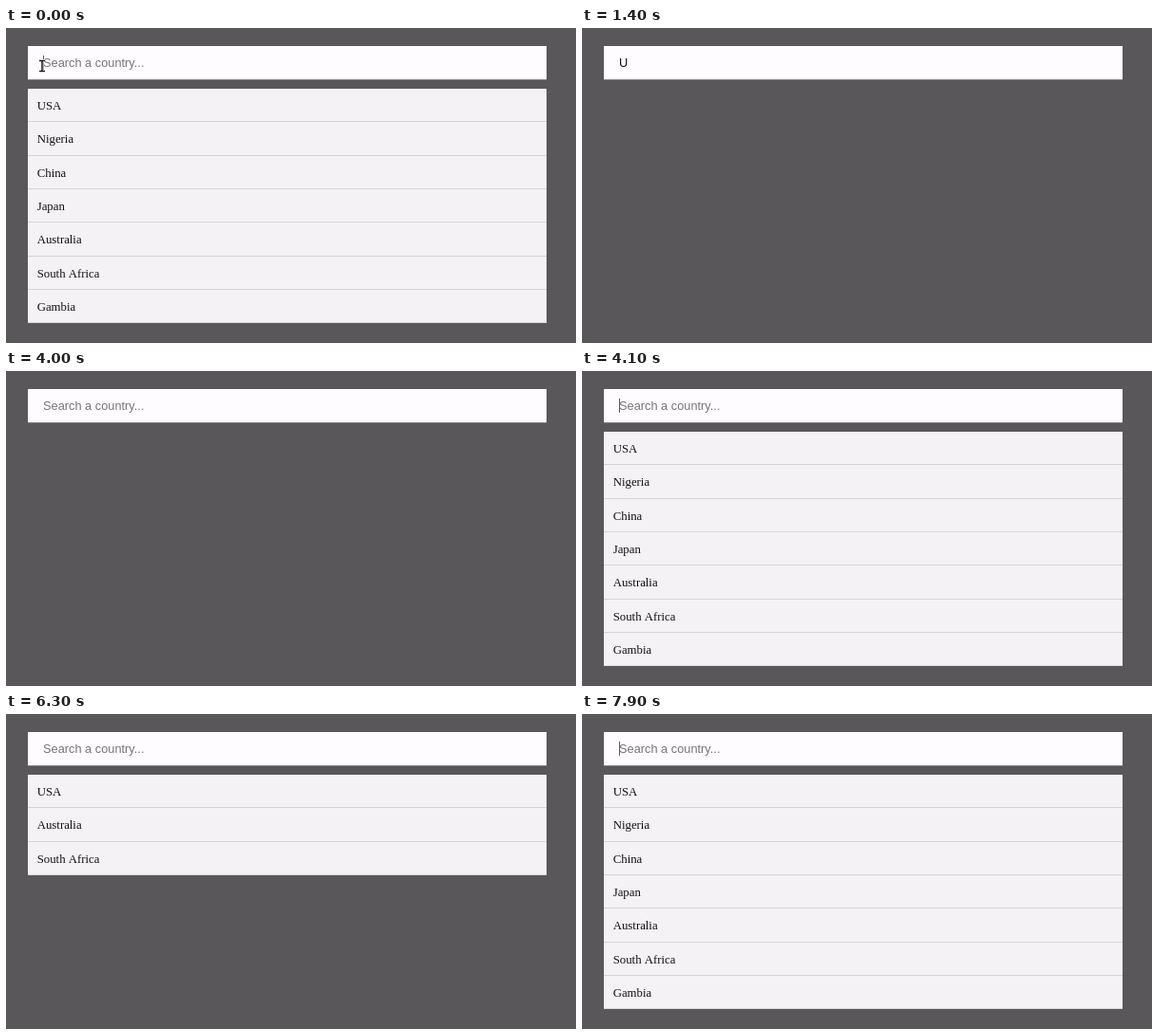
Recreate the animation shown at these times as an HTML page with a canvas. Size 600 by 332 pixels, loop 8000 ms.

```html
<!DOCTYPE html>
<html lang="en">
<head>
<meta charset="utf-8">
<title>Country search</title>
<style>
  html, body { margin: 0; width: 100%; height: 100%; overflow: hidden; background: #595759; }
  canvas { display: block; }
</style>
</head>
<body>
<canvas id="stage" width="600" height="332"></canvas>
<script>
const ctx = document.getElementById('stage').getContext('2d');
const LOOP = 8000;
const LEFT = 23, RIGHT = 569, WIDTH = RIGHT - LEFT;
const LIST_TOP = 64, ROW = 35.35, TEXT_X = 39;
const SANS = '12.8px "Liberation Sans", Arial, sans-serif';
const SERIF = '12.8px "Liberation Serif", "Times New Roman", serif';

const ALL = ['USA', 'Nigeria', 'China', 'Japan', 'Australia', 'South Africa', 'Gambia'];
const matching = query => ALL.filter(name => name.includes(query));

// Each track lists [start time, value]; values hold until the next entry.
const typed = [[0, ''], [1000, 'U'], [3400, ''], [4200, 'u'], [5800, '']];
const results = [
  [0, ALL], [1400, []], [4100, ALL],
  [4600, ['USA', ...matching('u')]], [6500, ALL]
];
const caret = [
  [0, true], [500, false], [1000, true], [1400, false], [2000, true], [2400, false],
  [3400, true], [4000, false], [4100, true], [4800, false], [5800, true],
  [6300, false], [6500, true], [7000, false], [7500, true]
];
const pointer = [[0, true], [1000, false]];

function valueAt(track, t) {
  let value;
  for (const [start, v] of track) if (t >= start) value = v;
  return value;
}

function box(x, y, w, h, color) {
  ctx.fillStyle = color;
  ctx.fillRect(x, y, w, h);
}

function label(text, x, y, font, color) {
  ctx.font = font;
  ctx.fillStyle = color;
  ctx.fillText(text, x, y);
}

function drawInput(text, caretOn) {
  box(LEFT, 19, WIDTH, 35.4, '#d2d0d2');
  box(LEFT, 19, WIDTH, 35, '#fefcff');
  label(text || 'Search a country...', TEXT_X, 41, SANS, text ? '#111111' : '#757477');
  if (caretOn) {
    const x = TEXT_X + Math.round(ctx.measureText(text).width);
    box(x, 29, 1, 15, text ? '#343236' : '#5c5a5d');
  }
}

function drawList(names) {
  if (!names.length) return;
  box(LEFT, LIST_TOP, WIDTH, Math.round(names.length * ROW), '#f4f2f5');
  names.forEach((name, i) => {
    const top = LIST_TOP + i * ROW;
    label(name, 32.7, Math.round(top + 22), SERIF, '#111111');
    box(LEFT, Math.round(top + ROW) - 1, WIDTH, 1, '#d6d4d7');
  });
}

function beam(color, width) {
  ctx.strokeStyle = color;
  ctx.lineWidth = width;
  ctx.beginPath();
  for (const y of [34.5, 45.5]) {
    ctx.moveTo(35, y);
    ctx.lineTo(41, y);
  }
  ctx.moveTo(38, 34.5);
  ctx.lineTo(38, 45.5);
  ctx.stroke();
}

function drawPointer() {
  ctx.lineCap = 'butt';
  beam('#ffffff', 3);
  beam('#1c1b1d', 1.5);
}

function draw(t) {
  box(0, 0, 600, 332, '#595759');
  drawInput(valueAt(typed, t), valueAt(caret, t));
  drawList(valueAt(results, t));
  if (valueAt(pointer, t)) drawPointer();
}

const start = performance.now();
function tick() {
  draw((performance.now() - start) % LOOP);
  requestAnimationFrame(tick);
}
tick();
</script>
</body>
</html>
```
